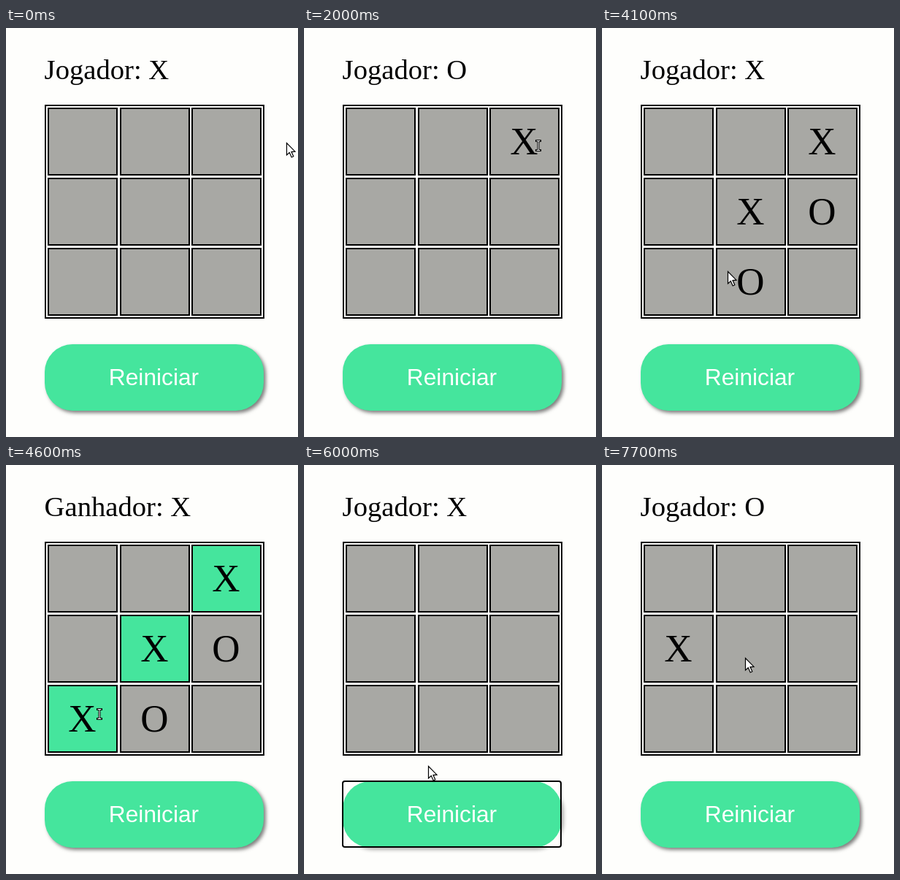
Animation of 400 by 560 pixels, one loop 8 s. Source, as an HTML page with a canvas:

```html
<!DOCTYPE html>
<html lang="pt">
<head>
<meta charset="utf-8">
<title>Jogo da velha</title>
<style>
html, body { margin: 0; width: 100%; height: 100%; overflow: hidden; background: #fefefc; }
canvas { display: block; }
</style>
</head>
<body>
<canvas id="stage" width="400" height="560"></canvas>
<script>
const ctx = document.getElementById('stage').getContext('2d');
const LOOP = 8000, STEP = 100;
const PAPER = '#fefefc', GRAY = '#a8a8a4', GREEN = '#45e59d', INK = '#000';
const SERIF = '"Liberation Serif", serif', SANS = '"Liberation Sans", sans-serif';
const CELL = { x: 57, y: 109, w: 96, h: 93, dx: 98.5, dy: 96 };

// The pointer glides from stop to stop and rests at each one.
const REST = 200;
const stop = (t, x, y, action) => ({ t, x, y, action });
const stops = [
  stop(1200, 384, 157),
  stop(1900, 321, 161, 'play'),
  stop(2600, 278, 253, 'play'),
  stop(3300, 222, 252, 'play'),
  stop(3900, 172, 333, 'play'),
  stop(4600, 128, 341, 'play'),
  stop(5400, 179, 442, 'reset'),
  stop(7100, 128, 273, 'play'),
  stop(7700, 196, 264)
];

// Each play marks the cell under the pointer.
const plays = stops.filter(s => s.action === 'play').map(({ t, x, y }) => ({
  t,
  col: Math.floor((x - CELL.x) / CELL.dx),
  row: Math.floor((y - CELL.y) / CELL.dy)
}));
const press = stops.find(s => s.action === 'reset').t + REST;
const reset = press + STEP;
const firstGame = plays.filter(p => p.t < reset);
const secondGame = plays.filter(p => p.t > reset);
const wonAt = firstGame.at(-1).t;

const cellLeft = col => Math.round(CELL.x + col * CELL.dx);
const cellTop = row => CELL.y + row * CELL.dy;
const cellCenter = ({ col, row }) => [cellLeft(col) + CELL.w / 2, cellTop(row) + CELL.h / 2];
const smooth = p => p * p * (3 - 2 * p);

function pointerAt(t) {
  const next = stops.findIndex(s => s.t > t);
  if (next < 0) return stops.at(-1);
  const a = stops[Math.max(0, next - 1)], b = stops[next];
  const leave = a.t + REST;
  const e = smooth(Math.max(0, (t - leave) / (b.t - leave)));
  return { x: a.x + (b.x - a.x) * e, y: a.y + (b.y - a.y) * e };
}

function text(str, x, y, font, color = INK, align = 'left') {
  ctx.font = font;
  ctx.fillStyle = color;
  ctx.textAlign = align;
  ctx.fillText(str, x, y);
}

function frame(x, y, w, h, radius = 0) {
  ctx.strokeStyle = INK;
  ctx.lineWidth = 2;
  ctx.beginPath();
  ctx.roundRect(x + 1, y + 1, w - 2, h - 2, radius);
  ctx.stroke();
}

function drawBoard(moves, won) {
  frame(53, 105, 301, 293);
  for (let row = 0; row < 3; row++) {
    for (let col = 0; col < 3; col++) {
      const box = [cellLeft(col), cellTop(row), CELL.w, CELL.h];
      ctx.fillStyle = won && row + col === 2 ? GREEN : GRAY;
      ctx.fillRect(...box);
      frame(...box);
    }
  }
  moves.forEach((move, i) => {
    const [cx, cy] = cellCenter(move);
    text(i % 2 ? 'O' : 'X', cx - 0.5, cy + 17, '53px ' + SERIF, INK, 'center');
  });
}

function fillButton() {
  ctx.fillStyle = GREEN;
  ctx.beginPath();
  ctx.roundRect(53, 433, 300, 91, 38);
  ctx.fill();
}

function drawButton(focused) {
  ctx.save();
  ctx.shadowColor = focused ? 'rgba(0,0,0,.3)' : 'rgba(0,0,0,.5)';
  ctx.shadowOffsetX = ctx.shadowOffsetY = 3;
  ctx.shadowBlur = 5;
  fillButton();
  ctx.restore();
  if (focused) {
    ctx.fillStyle = PAPER;
    ctx.fillRect(53, 433, 299, 90);
    fillButton();
    frame(52, 432, 301, 92, 3);
  }
  text('Reiniciar', 202.5, 489, '31.7px ' + SANS, '#fff', 'center');
}

function drawArrow() {
  ctx.beginPath();
  [[0.5, 0.5], [0.5, 17], [4.3, 13.6], [7.2, 20], [9.8, 18.8], [7, 12.6], [12, 12.2]]
    .forEach(([x, y]) => ctx.lineTo(x, y));
  ctx.closePath();
  ctx.fillStyle = '#fff';
  ctx.fill();
  ctx.strokeStyle = INK;
  ctx.lineWidth = 1.2;
  ctx.stroke();
}

function drawBeam() {
  for (const [color, width, cap] of [[INK, 3, 'square'], ['#fff', 1, 'butt']]) {
    ctx.beginPath();
    for (const y of [-6.5, 6.5]) {
      ctx.moveTo(-2.5, y);
      ctx.lineTo(2.5, y);
    }
    ctx.moveTo(0, -6.5);
    ctx.lineTo(0, 6.5);
    ctx.strokeStyle = color;
    ctx.lineWidth = width;
    ctx.lineCap = cap;
    ctx.stroke();
  }
}

function drawPointer(t, moves) {
  const at = pointerAt(t), x = Math.round(at.x), y = Math.round(at.y);
  const overText = moves.some(move => {
    const [cx, cy] = cellCenter(move);
    return Math.abs(x - cx) <= 25 && Math.abs(y - cy) <= 30;
  });
  ctx.save();
  ctx.translate(x, y);
  overText ? drawBeam() : drawArrow();
  ctx.restore();
}

function draw(t) {
  const moves = (t < reset ? firstGame : secondGame).filter(m => t >= m.t);
  const won = t >= wonAt && t < reset;
  const player = moves.length % 2 ? 'O' : 'X';
  ctx.fillStyle = PAPER;
  ctx.fillRect(0, 0, 400, 560);
  text(won ? 'Ganhador: X' : 'Jogador: ' + player, 52.6, 70, '38.65px ' + SERIF);
  drawBoard(moves, won);
  drawButton(t >= press && t < secondGame[0].t);
  drawPointer(t, moves);
}

const start = performance.now();
function tick() {
  const t = (performance.now() - start) % LOOP;
  draw(Math.floor(t / STEP) * STEP);
  requestAnimationFrame(tick);
}
tick();
</script>
</body>
</html>
```
